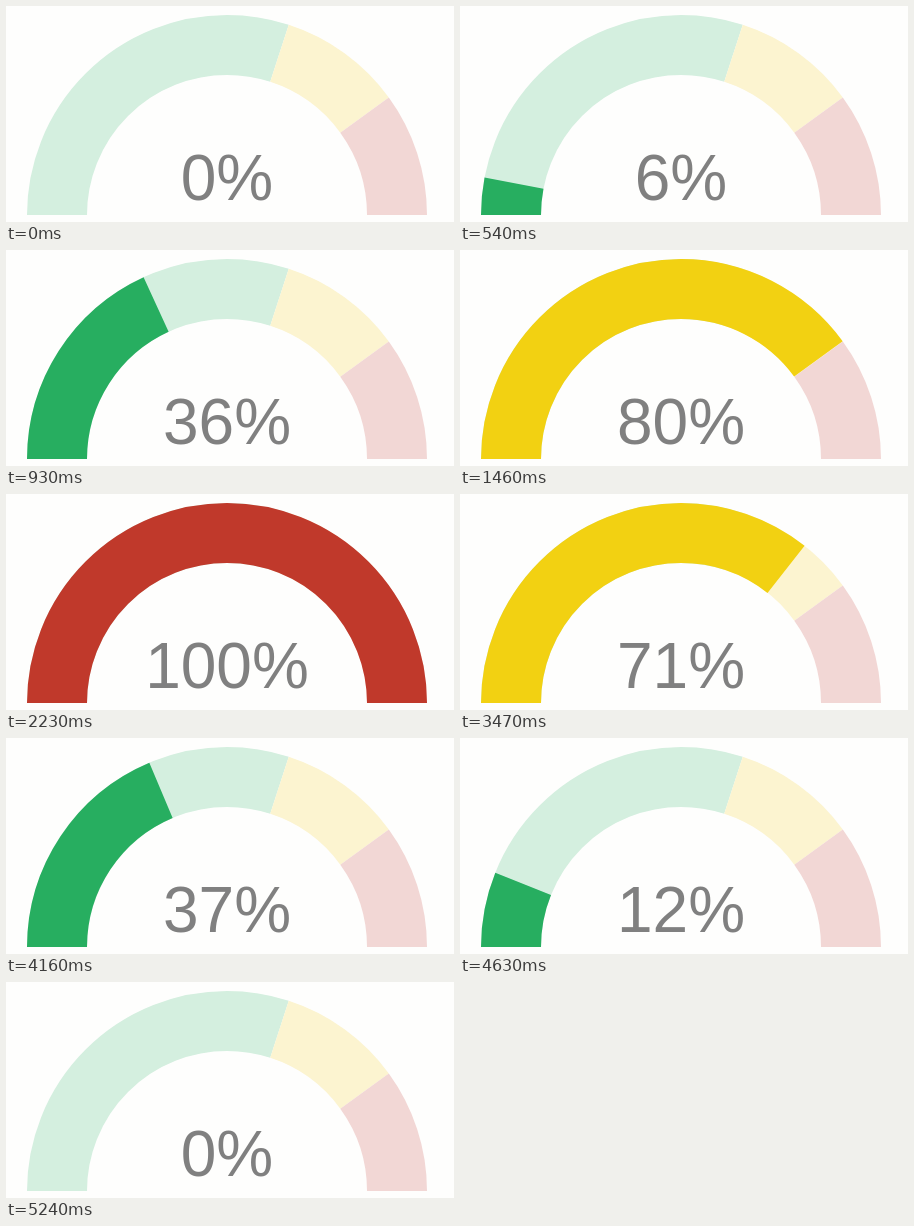
These frames come from a looping animation (448x216 px, 6020 ms). An HTML page:

```html
<!DOCTYPE html>
<html lang="en">
<head>
<meta charset="utf-8">
<title>Gauge</title>
<style>
  html, body { margin: 0; width: 100%; height: 100%; overflow: hidden; background: #fefefd; }
  svg { display: block; width: 448px; height: 216px; }
  path { fill: none; stroke-width: 60; }
  text { font: 64px "Liberation Sans", Arial, sans-serif; fill: #808080; text-anchor: middle; }
</style>
</head>
<body>
<svg viewBox="0 0 448 216">
  <g id="track"></g>
  <path id="fill"/>
  <text id="label" x="221" y="194">0%</text>
</svg>
<script>
const LOOP = 6020;
const ARC = "M51 209A170 170 0 0 1 391 209";
const ZONES = [
  { from: 0, to: 60, color: "#27ae60", pale: "#d4efdf" },
  { from: 60, to: 80, color: "#f2d112", pale: "#fcf4d0" },
  { from: 80, to: 100, color: "#c0392b", pale: "#f2d7d5" }
];

// Each phase advances in even ticks; keys are [tick, value].
const RISE = {
  start: 236, step: 76.5,
  keys: [[-1, 0], [3, 6], [7, 22.1], [9, 36.3], [16, 79.95], [20, 93.5], [26, 100]]
};
const FALL = {
  start: 2625, step: 76.7,
  keys: [[-1, 100], [3, 95.5], [8, 81], [11, 71.2], [16, 55.1], [20, 37.3], [24, 19.1], [28, 7], [34, 0]]
};

const track = document.getElementById("track");
const fill = document.getElementById("fill");
const label = document.getElementById("label");

function setArc(path, from, to, color) {
  path.setAttribute("d", ARC);
  path.setAttribute("pathLength", 100);
  path.setAttribute("stroke", color);
  path.setAttribute("stroke-dasharray", `0 ${from} ${to - from} 200`);
}

function slope(keys, i) {
  if (i === 0 || i === keys.length - 1) return 0;
  const [x0, y0] = keys[i - 1], [x1, y1] = keys[i + 1];
  return (y1 - y0) / (x1 - x0);
}

// Smooth cubic curve through the keys, flat at both ends.
function curve(keys, x) {
  const last = keys.length - 1;
  if (x <= keys[0][0]) return keys[0][1];
  if (x >= keys[last][0]) return keys[last][1];
  const i = keys.findIndex(k => k[0] > x) - 1;
  const [x0, y0] = keys[i], [x1, y1] = keys[i + 1];
  const w = x1 - x0, u = (x - x0) / w, v = 1 - u;
  return y0 * v * v * (1 + 2 * u) + y1 * u * u * (3 - 2 * u)
    + w * u * v * (slope(keys, i) * v - slope(keys, i + 1) * u);
}

function valueAt(t) {
  const phase = t < FALL.start ? RISE : FALL;
  return curve(phase.keys, Math.floor((t - phase.start) / phase.step));
}

function draw(t) {
  const value = valueAt(t);
  const zone = ZONES.find(z => value <= z.to);
  setArc(fill, 0, value, zone.color);
  fill.style.display = value > 0 ? "" : "none";
  label.textContent = Math.round(value) + "%";
}

for (const z of ZONES) {
  const path = document.createElementNS("http://www.w3.org/2000/svg", "path");
  setArc(path, z.from, z.to, z.pale);
  track.append(path);
}

const begin = performance.now();
function frame() {
  draw((performance.now() - begin) % LOOP);
  requestAnimationFrame(frame);
}
frame();
</script>
</body>
</html>
```
